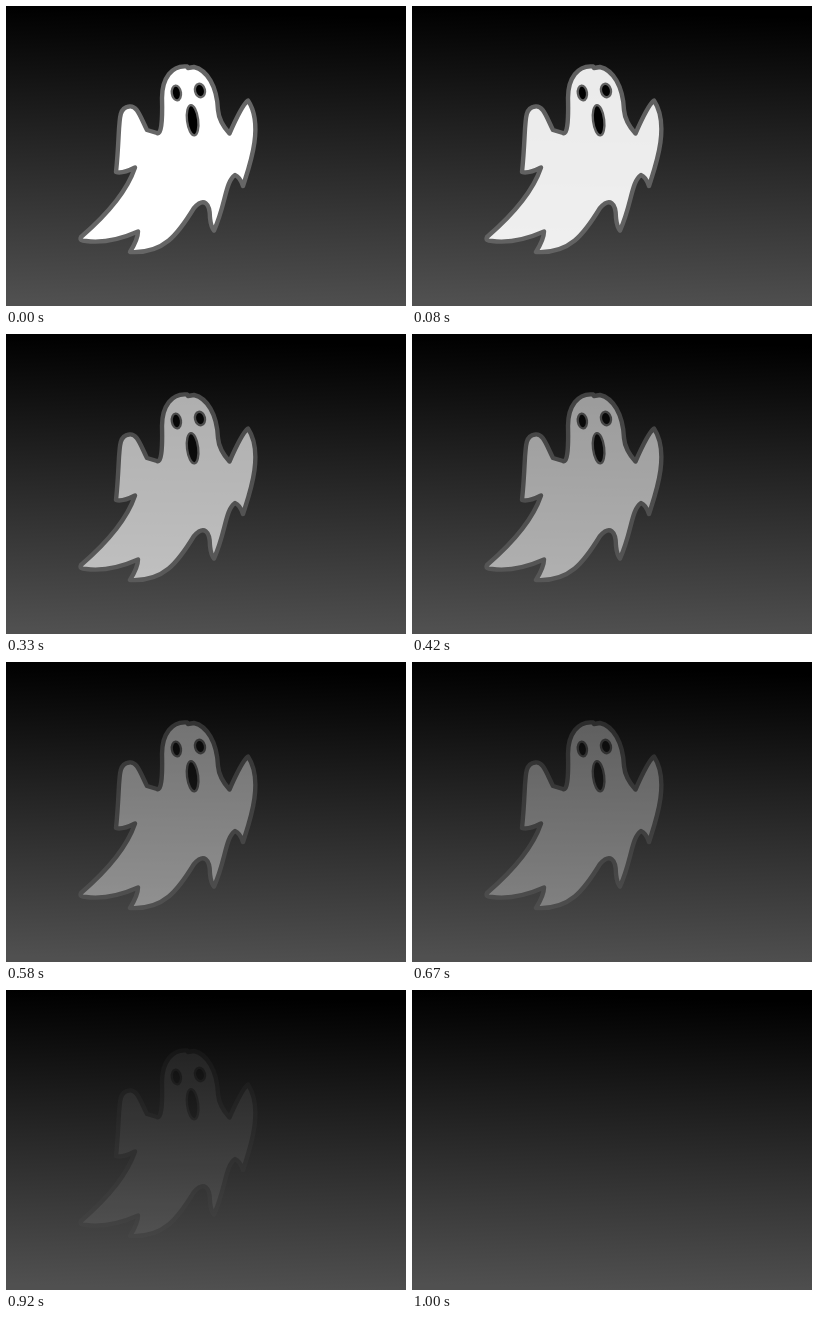
An HTML page that plays this animation: 400x300 px, repeating every 1040 ms.

```html
<!DOCTYPE html>
<html lang="en">
<head>
<meta charset="utf-8">
<title>Fading ghost</title>
<style>
  html, body { margin: 0; width: 100%; height: 100%; overflow: hidden; background: #000; }
  svg { display: block; width: 100%; height: 100%; }
</style>
</head>
<body>
<svg viewBox="0 0 400 300">
  <defs>
    <linearGradient id="night" gradientUnits="userSpaceOnUse" x1="206" y1="6" x2="197" y2="300">
      <stop offset="0" stop-color="#000"/>
      <stop offset="1" stop-color="#505050"/>
    </linearGradient>
  </defs>
  <rect width="400" height="300" fill="url(#night)"/>
  <g id="ghost" stroke="#666" stroke-linejoin="round">
    <!-- head and left arm, tail, right arm, back to the head -->
    <path fill="#fff" stroke-width="4.4" d="
      M181 60.5 C166 59 156 72 156 92 Q157 130 151 127 L141 124
      C134 110 131 99 123 100.5 C110 102 115 118 110 166 Q116 168 129 161.5
      Q118 194 75 231 Q73 235 80 235 Q104 238 132 225.5 Q132 233 124 246
      C158 248 172 228 188 202 C198 191 204 197 204 212 Q205 221 208 224.5
      C220 198 219 176 229 169 Q234 171 237 180
      C242 164 259 120 242 94.5 Q236 99 223.5 127.5
      Q213 116 212 104 C211 80 201 64 188 61 L182 62 Z"/>
    <g fill="#000" stroke-width="2.3">
      <ellipse cx="170.4" cy="87" rx="4.6" ry="7.4" transform="rotate(-8 170.4 87)"/>
      <ellipse cx="194" cy="84.5" rx="5" ry="6.8" transform="rotate(-12 194 84.5)"/>
      <ellipse cx="186.6" cy="114.2" rx="5.6" ry="15.2" transform="rotate(-7 186.6 114.2)"/>
    </g>
  </g>
</svg>
<script>
  const LOOP = 1040;
  const FADE = 1000;
  const STEPS = 12;

  const ghost = document.getElementById("ghost");

  // Steps begin on whole hundredths of a second.
  const stepStart = step => Math.round(step * FADE / STEPS / 10) * 10;

  function draw(time) {
    const t = time % LOOP;
    let step = STEPS;
    while (step > 0 && stepStart(step) > t) step--;
    ghost.setAttribute("opacity", 1 - step / STEPS);
  }

  const start = performance.now();
  function tick() {
    draw(performance.now() - start);
    requestAnimationFrame(tick);
  }
  tick();
</script>
</body>
</html>
```
